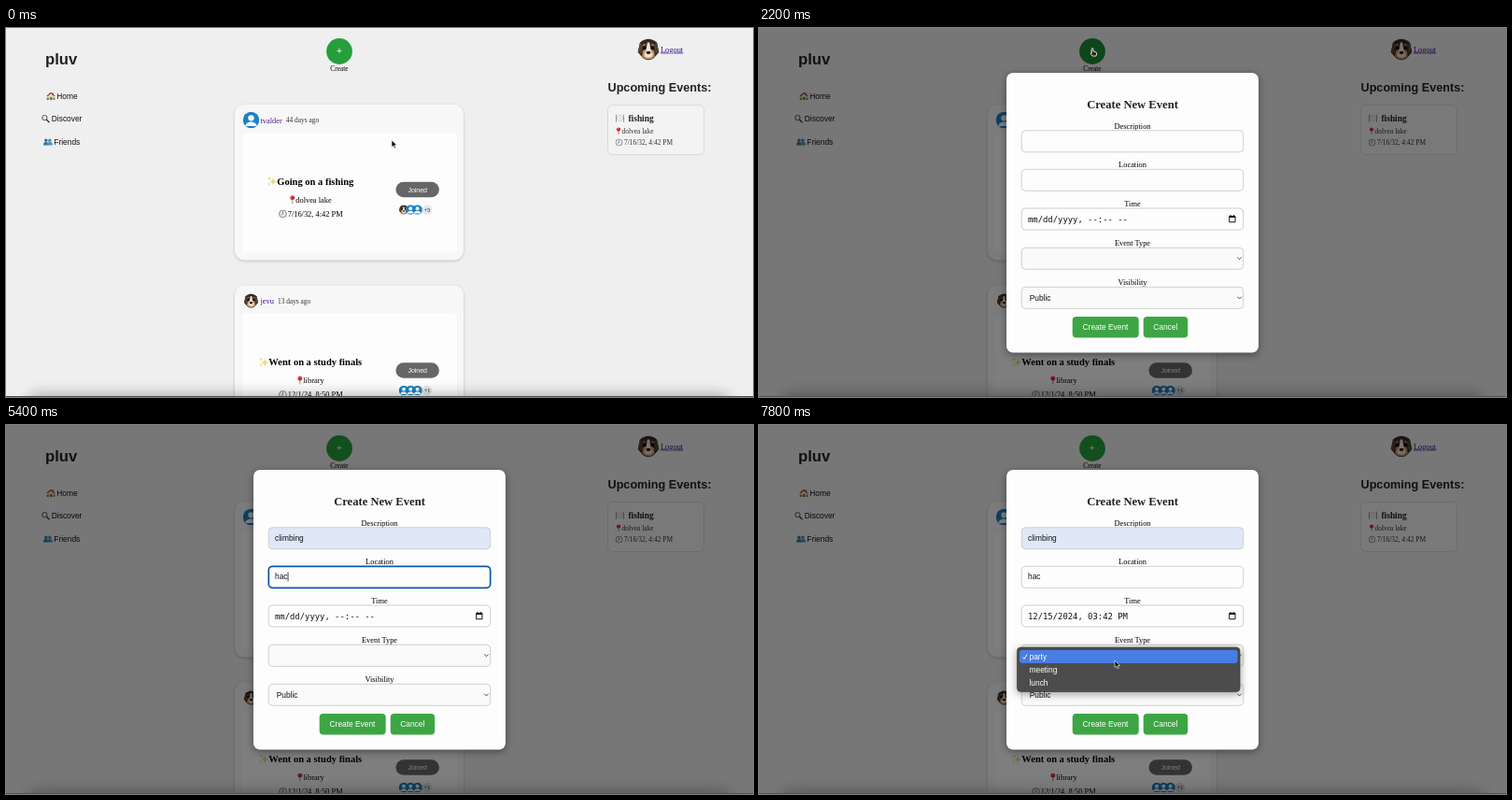
Animation, 800 px wide and 395 px high, one loop 8000 ms. Source, as an HTML page:

```html
<!DOCTYPE html>
<html lang="en">
<head>
<meta charset="utf-8">
<title>Event feed</title>
<style>
  html, body { margin: 0; width: 100%; height: 100%; overflow: hidden; background: #efefef; }
  svg { display: block; }
  #stage { width: 100vw; height: 100vh; }
  text { font-family: "Liberation Serif", serif; font-size: 8.4px; white-space: pre; }
  .sans { font-family: "Liberation Sans", sans-serif; }
  .mono { font-family: "DejaVu Sans Mono", monospace; font-size: 8.9px; }
  .mid { text-anchor: middle; }
  .bold { font-weight: bold; }
  .card { filter: drop-shadow(0 1px 1.5px #0003); }
  .popup { filter: drop-shadow(0 2px 4px #0006); }
</style>
</head>
<body>
<svg id="stage" viewBox="0 0 800 395">
  <defs>
    <filter id="blur" x="-10%" y="-300%" width="120%" height="700%"><feGaussianBlur stdDeviation="8"/></filter>
    <clipPath id="round"><circle cx="8" cy="8" r="8"/></clipPath>
    <symbol id="user" viewBox="0 0 16 16">
      <g clip-path="url(#round)"><rect width="16" height="16" fill="#1b82c6"/>
      <circle cx="8" cy="6" r="2.9" fill="#fff"/><path d="M2.5 14C2.5 8.5 13.5 8.5 13.5 14Z" fill="#fff"/></g>
    </symbol>
    <symbol id="dog" viewBox="0 0 16 16">
      <path d="M2 3Q8-2 14 3L15.5 10 12 14Q8 17 4 14L.5 10Z" fill="#342a25"/>
      <path d="M2 3L.5 10 3 11 4 5ZM14 3l1.5 7-2.5 1-1-6Z" fill="#594031"/>
      <path d="M4 9Q6 7 8 8.5 10 7 12 9L12.5 13Q8 17 3.5 13Z" fill="#c49163"/>
      <path d="M7.2 3h1.6L10 11H6Z" fill="#efe6dc"/>
      <ellipse cx="8" cy="11.5" rx="3" ry="2.4" fill="#ecdccb"/>
      <ellipse cx="8" cy="10.2" rx="1.6" ry="1.1" fill="#17110f"/>
      <circle cx="5" cy="7" r="1.1" fill="#0d0a09"/><circle cx="11" cy="7" r="1.1" fill="#0d0a09"/>
      <path d="M4 5l2-.6M12 5l-2-.6" stroke="#b77d4d"/>
    </symbol>
    <symbol id="spark" viewBox="0 0 16 16">
      <path d="M9.5 1.5Q10 8 15.5 9 10 10 9.5 16 9 10 4 9 9 8 9.5 1.5ZM4 1Q4.200 3.800 6.500 4 4.200 4.500 4 7 3.800 4.500 1 4 3.800 3.800 4 1ZM3.500 10Q4 12 6 12.500 4 13 3.500 15 3 13 1 12.500 3 12 3.500 10Z" fill="#e9dc7e"/>
    </symbol>
    <symbol id="pin" viewBox="0 0 16 16">
      <path d="M8 6V16" stroke="#888" stroke-width="1.6"/><circle cx="8" cy="4.500" r="4.300" fill="#d3262f"/>
      <circle cx="6.600" cy="3" r="1.200" fill="#f08d8d"/>
    </symbol>
    <symbol id="clock" viewBox="0 0 16 16">
      <circle cx="8" cy="8" r="7" fill="#ececec" stroke="#808080" stroke-width="1.700"/>
      <path d="M8 3.500V8l-3 2" fill="none" stroke="#555" stroke-width="1.200"/>
    </symbol>
    <symbol id="house" viewBox="0 0 16 16">
      <path d="M3 7h10v8H3Z" fill="#e8d3b8"/><path d="M0 8L8 1l8 7-1.500 1L8 4 1.500 9Z" fill="#9c3f32"/>
      <path d="M7 10h3v5H7Z" fill="#7b4630"/><path d="M11 2h2v4l-2-2Z" fill="#9c5a48"/>
      <circle cx="2.500" cy="13" r="2.300" fill="#55923d"/><circle cx="14" cy="13" r="2" fill="#55923d"/>
    </symbol>
    <symbol id="lens" viewBox="0 0 16 16">
      <path d="M9.500 9.500L15 15" stroke="#333" stroke-width="2.500"/>
      <circle cx="6" cy="6" r="4.700" fill="#dcebf2" stroke="#444" stroke-width="1.600"/>
    </symbol>
    <symbol id="people" viewBox="0 0 16 16">
      <g fill="#347494"><circle cx="4.500" cy="5.500" r="2.700"/><path d="M0 14Q0 8.500 4.500 8.500T9 14Z"/></g>
      <g fill="#4e94b8"><circle cx="11" cy="5.500" r="2.900"/><path d="M6 14Q6 8.500 11 8.500T16 14Z"/></g>
    </symbol>
    <symbol id="plate" viewBox="0 0 16 16">
      <circle cx="8" cy="8" r="4.800" fill="#fff" stroke="#aaa"/><circle cx="8" cy="8" r="2.700" fill="#e4e4e4"/>
      <path d="M1.500 2v13M14.500 2v13" stroke="#8d8d8d" stroke-width="1.500"/>
    </symbol>
  </defs>
  <g id="scene"></g>
</svg>
<script>
const LOOP = 8000, STEP = 200, FAR = 1112;
const BLUE = '#0b66f2', GREEN = '#3da544';
const scene = document.getElementById('scene');
const ruler = document.createElement('canvas').getContext('2d');

const widthOf = (s, size, family = 'Liberation Serif', weight = '') => {
  ruler.font = `${weight} ${size * 10}px "${family}"`;
  return ruler.measureText(s).width / 10;
};
const text = (x, y, s, cls = '', fill = '#111', size) =>
  `<text x="${x}" y="${y}" class="${cls}" fill="${fill}" ${size ? `style="font-size:${size}px"` : ''}>${s}</text>`;
const rect = (x, y, w, h, r, fill, extra = '') =>
  `<rect x="${x}" y="${y}" width="${w}" height="${h}" rx="${r}" fill="${fill}" ${extra}/>`;
const path = (d, stroke = '#111', width = 1, fill = 'none') =>
  `<path d="${d}" stroke="${stroke}" stroke-width="${width}" fill="${fill}"/>`;
const icon = (id, cx, cy, size) =>
  `<use href="#${id}" x="${cx - size / 2}" y="${cy - size / 2}" width="${size}" height="${size}"/>`;

// Icon and text, centred together
function iconLine(cx, y, id, iconWidth, s, size = 8.4, cls = '') {
  const left = cx - (iconWidth + widthOf(s, size, undefined, cls)) / 2;
  return icon(id, left + iconWidth / 2, y - size * .34, size + .6) + text(left + iconWidth, y, s, cls, '#000', size);
}

const smooth = (t, a, b) => {
  const p = Math.min(1, Math.max(0, (t - a) / (b - a)));
  return p * p * (3 - 2 * p);
};

const finals = { title: ['Went on a study finals'], place: 'library', time: '12/1/24, 8:50 PM', status: 'Joined' };
const homework = { title: ['Went on a Do my', 'assignments'], place: 'St Corveld lobby', time: '11/18/24, 5:30 AM' };
const trip = { title: ['Going on a fishing'], place: 'dolvea lake', time: '7/16/32, 4:42 PM', status: 'Joined' };
const trio = ['user', 'user', 'user'];
const events = [
  { ...trip, name: 'tvalder', days: 44, guests: ['dog', 'user', 'user'], more: '+5' },
  { ...finals, name: 'jevu', days: 13, guests: trio, more: '+1' },
  { ...finals, name: 'taneku', days: 14, guests: trio },
  { ...finals, name: 'jevu', days: 16, guests: trio },
  { ...finals, name: 'taneku', days: 20, guests: ['dog', 'user'] },
  { ...homework, name: 'jevu', days: 26, status: 'Joined', guests: ['dog'] },
  { ...homework, name: 'taneku', days: 26, status: 'Finished', guests: [] },
  { ...homework, name: 'jevu', days: 29, status: 'Finished', guests: [] },
  { ...finals, name: 'taneku', days: 30, guests: trio },
];
const linkColors = { tvalder: '#551a8b', jevu: '#35199c', taneku: '#1414c4' };

function card(e, y) {
  const tall = e.title.length > 1, height = tall ? 180 : 166.5;
  const dateX = 272.5 + widthOf(e.name, 8.4) + 4;
  const placeY = y + (tall ? 117.5 : 104.5), pillY = y + (tall ? 101.3 : 91), guestY = y + (tall ? 124.3 : 112.5);
  const pill = e.status === 'Finished' ? 52 : 46.5;
  const title = tall
    ? icon('spark', 258.3, y + 83.5, 11) + text(264, y + 87, e.title[0], 'bold', '#000', 10.5) + text(253, y + 100, e.title[1], 'bold', '#000', 10.5)
    : iconLine(326, y + 85.5, 'spark', 10.5, e.title[0], 10.5, 'bold');
  return rect(245, y, 245, height, 10, '#f7f7f7', 'class="card"')
    + rect(253, y + 30.5, 230, height - 38.5, 4, '#fdfdfd')
    + icon(e.name === 'jevu' ? 'dog' : 'user', 262.5, y + 16.5, e.name === 'jevu' ? 16 : 17.5)
    + text(272.5, y + 19.5, e.name, '', linkColors[e.name])
    + text(dateX, y + 19, e.days + ' days ago', '', '#333', 7.4)
    + title
    + iconLine(326, placeY, 'pin', 7, e.place)
    + iconLine(326, placeY + 15.3, 'clock', 10.5, e.time)
    + rect(440.7 - pill / 2, pillY - 8.3, pill, 16.6, 8.3, '#666')
    + text(440.7, pillY + 2.6, e.status, 'sans mid', '#fff', 7)
    + e.guests.map((g, i) => icon(g, 426 + i * 7.3, guestY, 10.6)).join('')
    + (e.more ? `<circle cx="451" cy="${guestY}" r="5.3" fill="#e6e6e6"/>` + text(451, guestY + 2, e.more, 'mid', '#111', 6.2) : '');
}

function feed(scroll, hover) {
  let y = 82 - scroll, out = '';
  out += `<circle cx="357" cy="${25 - scroll}" r="13.9" fill="${hover ? '#1f8c36' : '#259f3b'}"/>`
    + text(357, 28.3 - scroll, '+', 'sans mid', '#fff', 10)
    + text(357, 46 - scroll, 'Create', 'mid', '#000', 7.4);
  for (const e of events) {
    if (y < 400 && y > -190) out += card(e, y);
    y += e.title.length > 1 ? 206.5 : 193.5;
  }
  return out;
}

const page = text(42, 39, 'pluv', 'sans bold', '#222', 16.7)
  + icon('house', 48, 72.8, 9.5) + text(54.3, 75.8, 'Home', 'sans')
  + icon('lens', 42.5, 97.2, 9) + text(48.8, 100.2, 'Discover', 'sans')
  + icon('people', 45, 121.8, 10) + text(51.3, 124.6, 'Friends', 'sans')
  + icon('dog', 688, 23, 24)
  + `<text x="701" y="25.5" fill="#3c148f" text-decoration="underline">Logout</text>`
  + text(644.5, 68.3, 'Upcoming Events:', 'sans bold', '#222', 12.65)
  + rect(644.5, 82.5, 103, 53, 5, '#f3f3f3', 'stroke="#dadada"')
  + icon('plate', 657.5, 96.5, 10) + text(666.5, 100, 'fishing', 'bold', '#222', 9.4)
  + icon('pin', 656, 110.3, 8) + text(659.6, 113.2, 'dolvea lake', '', '#333', 7.4)
  + icon('clock', 656.5, 122.6, 8) + text(662, 125.4, '7/16/32, 4:42 PM', '', '#333', 7.4);

function field(label, y, fill = '#fdfdfd', focused = false) {
  return text(400, y - 2, label, 'mid', '#000')
    + rect(281.3, y + .3, 237.4, 23, 4, fill, focused ? 'stroke="#0d57ab" stroke-width="1.7"' : 'stroke="#cbcbcb" stroke-width=".9"');
}
const chevron = y => path(`M512.3 ${y - 1}l2.200 2.200 2.200-2.200`, '#333', .9);
const caret = (s, y) => path(`M${288.5 + widthOf(s, 8.4, 'Liberation Sans')} ${y - 8}v10`, '#111', .8);

function modal(t) {
  const first = t < 2800 ? '' : 'climbing'.slice(0, t < 3000 ? 0 : t < 3200 ? 2 : 8);
  const second = 'hac'.slice(0, Math.max(0, (t - 4800) / STEP));
  const onFirst = t >= 2800 && t < 3800, onSecond = t >= 3800 && t < 6000;
  const time = t >= 6800 ? '12/15/2024, 03:42 PM' : 'mm/dd/yyyy, --:-- --';
  return rect(265, 48, 270, 299.5, 7, '#fdfdfd', 'class="popup"')
    + text(400, 86, 'Create New Event', 'bold mid', '#222', 12.6)
    + field('Description', 109.5, first.length > 2 ? '#dfe8f7' : '#fdfdfd', onFirst) + text(288, 124, first, 'sans')
    + field('Location', 151, '#fdfdfd', onSecond) + text(288, 165.3, second, 'sans')
    + field('Time', 192.7) + text(288, 207.6, time, 'mono')
    + path('M503.700 201.500h6.300v6.300h-6.300ZM503.700 202.500h6.300M505 200v1.500M508.700 200v1.500', '#111', 1)
    + field('Event Type', 235, '#fafafa') + chevron(246.5)
    + field('Visibility', 277, '#fafafa') + text(289.7, 291.8, 'Public', 'sans') + chevron(288.7)
    + (onFirst ? caret(first, 124) : onSecond ? caret(second, 165.3) : '')
    + rect(335.7, 309, 71, 22.5, 4, GREEN) + text(371, 323.2, 'Create Event', 'sans mid', '#fff')
    + rect(411.7, 309, 47.5, 22.5, 4, GREEN) + text(435.3, 323.2, 'Cancel', 'sans mid', '#fff');
}

function calendar(chosen) {
  let out = rect(281, 217, 207.5, 148.5, 1, '#fff', 'stroke="#777" stroke-width=".8" class="popup"')
    + text(287, 231, 'December 2024', 'sans bold', '#111', 6.3)
    + path('M335 227.500h4.400l-2.200 2.700Z', 'none', 0, '#111')
    + path('M366 234v-9M362.500 228.500l3.500-3.500 3.500 3.500', '#aaa', .9)
    + path('M383 225v9M379.500 230.500l3.500 3.500 3.500-3.500', '#222', .9)
    + text(292.5, 356.4, 'Clear', 'sans', BLUE, 6.8) + text(367.5, 356.4, 'Today', 'sans', BLUE, 6.8);
  const colX = i => 294 + i * 14.83;
  [...'SMTWTFS'].forEach((d, i) => out += text(colX(i), 250.5, d, 'sans mid', '#111', 6.8));
  for (let i = 0; i < 42; i++) {
    const day = i + 1, x = colX(i % 7), y = 266 + Math.floor(i / 7) * 14.83, on = day === chosen;
    if (on) out += rect(x - 7.5, y - 10, 15, 15, 1, BLUE);
    out += text(x, y, day > 31 ? day - 31 : day, 'sans mid' + (on ? ' bold' : ''), on ? '#fff' : day < 14 ? '#aaa' : day > 31 ? '#777' : '#111', 7);
  }
  const pad = n => String(n).padStart(2, '0');
  const columns = [
    Array.from({ length: 7 }, (_, i) => pad(i + 3)),
    Array.from({ length: 7 }, (_, i) => i + 42),
    ['PM', 'AM'],
  ];
  columns.forEach((items, c) => {
    const x = 412.2 + c * 29.6;
    out += rect(x - 13.8, 224.5, 27.6, 19, 1, BLUE);
    items.forEach((s, i) => out += text(x, 236.6 + i * 19, s, 'sans mid' + (i ? '' : ' bold'), i ? '#111' : '#fff', 7));
  });
  return out;
}

const typeMenu = rect(276.5, 238, 238.5, 47.5, 4, '#4c4c4c', 'stroke="#333" stroke-width=".6" class="popup"')
  + rect(279, 241, 233.5, 14, 3, '#487de4')
  + path('M282.300 248.500l1.700 2 3-5', '#fff', 1)
  + ['party', 'meeting', 'lunch'].map((s, i) => text(289.5, 251 + i * 13.8, s, 'sans', '#fff')).join('');

// Pointer stops: time, x, y
const stops = [
  [0, 413, 120], [200, 413, 120], [1000, 366, 60], [1200, 366, 60], [2000, 357, 22], [2200, 357, 22],
  [2800, 384, 121], [3000, 384, 121], [3400, 384, 164], [5600, 384, 164], [6200, 506, 208], [6400, 506, 208],
  [6800, 294, 292], [7000, 294, 292], [7400, 381, 247], [7800, 381, 252], [8000, 381, 252],
];

function pointer(t) {
  if (t >= 4200 && t < 5600) return '';
  const i = stops.findIndex(s => s[0] > t);
  const [a, b] = [stops[i - 1], stops[i]];
  const p = smooth(t, a[0], b[0]);
  const x = a[1] + (b[1] - a[1]) * p, y = a[2] + (b[2] - a[2]) * p;
  const beam = t >= 2800 && t < 5800, hand = t >= 2000 && t < 2400;
  const shape = beam
    ? path('M-2-4.200Q0-4.200 0-3 0-4.200 2-4.200M0-3V3M-2 4.200Q0 4.200 0 3 0 4.200 2 4.200M-1 .7h2', '#111', .9)
    : hand
      ? path('M-.700 0Q.500-1 1 0V3l3 1q1 .5.500 2L4 8H0L-2 5q.5-1 1.300 0Z', '#fff', .8, '#222')
      : path('M0 0V7.500L1.800 6 3 8.800 4.400 8.200 3.200 5.500H5.600Z', '#fff', .6, '#111');
  return `<g transform="translate(${x} ${y})">${shape}</g>`;
}

function render(t) {
  const scroll = FAR * (smooth(t, 100, 1000) - smooth(t, 1200, 1900));
  const open = t >= 2200;
  let out = rect(0, 0, 800, 395, 0, '#efefef') + feed(scroll, t >= 2000 && t < 2400) + page;
  if (scroll > 0) out += rect(596, scroll / FAR * 224.5, 3.4, 83, 1.7, '#7a7a7a');
  if (open) out += rect(0, 0, 800, 395, 0, '#000', 'opacity=".5"') + modal(t);
  if (t >= 6200 && t < 7200) out += calendar(t >= 6800 ? 15 : 14);
  if (t >= 7600) out += typeMenu;
  out += rect(25, 393, 750, 20, 8, '#000', 'opacity=".32" filter="url(#blur)"')
    + rect(0, 394, 800, 1, 0, open ? '#544f5a' : '#4c4c4c');
  scene.innerHTML = out + pointer(t);
}

let shown = -1;
function tick() {
  const t = Math.floor(performance.now() % LOOP / STEP) * STEP;
  if (t !== shown) render(shown = t);
  requestAnimationFrame(tick);
}
tick();
</script>
</body>
</html>
```
